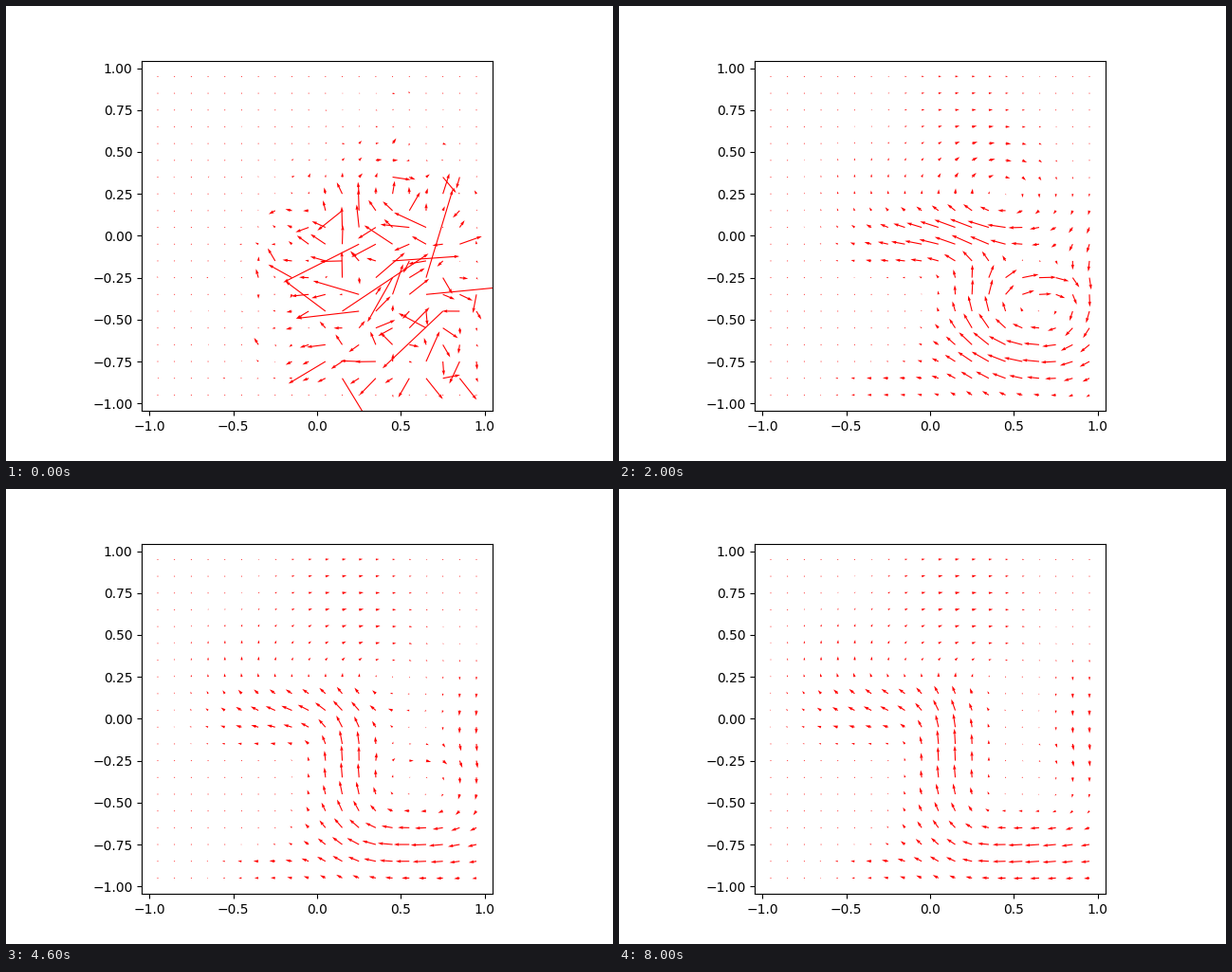
These frames come from a looping animation (640x480 px, 8.05 s). A matplotlib script:

```python
import numpy as np
import matplotlib.pyplot as plt
from matplotlib.animation import FuncAnimation

N = 20            # arrows per side
FRAMES = 161
STEP = 50         # ms
SETTLE = 21       # steps until the opening turbulence is gone

axis = np.linspace(-0.95, 0.95, N)
X, Y = np.meshgrid(axis, axis)


def stream(e, start, end, size):
    """Gaussian current drifting from start to end, each (x, y, u, v)."""
    (x0, y0, *vel0), (x1, y1, *vel1) = start, end
    x, y = x0 + (x1 - x0) * e, y0 + (y1 - y0) * e
    fade = (1 - e) ** 1.8
    vel = np.array(vel0) * fade + np.array(vel1) * (1 - fade)
    weight = np.exp(-(((X - x) / size[0]) ** 2 + ((Y - y) / size[1]) ** 2) / 2)
    return weight[..., None] * vel


def swirl(x, y, speed, radius):
    """Clockwise vortex with its peak speed at the given radius."""
    dx, dy = (X - x) / radius, (Y - y) / radius
    weight = speed * np.exp((1 - dx ** 2 - dy ** 2) / 2)
    return np.stack([dy * weight, -dx * weight], axis=-1)


def flow(t):
    """Velocity in pixels once the turbulence has settled; t in ms."""
    e = np.log(max(t, 1050) / 1050) / np.log(8000 / 1050)
    west = stream(e, (.4, -.01, -32, 3), (-.22, .1, -9, 3), (.33, .09))
    backwash = stream(e, (.15, -.14, -15, 0), (-.4, -.08, -5, 0), (.3, .08))
    column = stream(e, (.38, -.45, -1, 14), (.12, -.18, 0, 16), (.14, .23))
    inner = stream(e, (.57, -.32, 40, 3), (.68, -.2, 2, -1), (.2, .08))
    wall = stream(e, (.94, -.45, -5, -20), (.9, -.1, 0, -7), (.12, .33))
    floor = stream(e, (.55, -.69, -20, 3), (.62, -.8, -16, -1), (.33, .15))
    ramp = stream(e, (.42, -.72, -4, 6), (.05, -.68, -4, 7), (.18, .22))
    tail = stream(e, (-.25, -.9, -6, 1), (-.25, -.88, -6, 0), (.25, .08))
    rise = stream(e, (-.25, .22, -1, 3), (-.5, .35, 0, 4), (.32, .25))
    top = stream(e, (.2, .75, 3, 0), (.15, .75, 5, .7), (.33, .35))
    eddy = swirl(.4, .24, 1 + 7 * (1 - e) ** 1.8, .2)
    return (west + backwash + column + inner + wall + floor
            + ramp + tail + rise + top + eddy)


def opening(calm):
    """Random arrows, longest in the lower right, over an outward push."""
    rng = np.random.default_rng(4)
    dx, dy = X - .5, Y + .35
    dist = np.hypot(dx, dy)
    length = rng.exponential(26 * np.exp(-(dist / .6) ** 2.5) + .4)
    angle = rng.uniform(0, 2 * np.pi, (N, N))
    field = .4 * calm + length[..., None] * np.stack(
        [np.cos(angle), np.sin(angle)], axis=-1)
    push = 10 * np.exp(-((dist - .55) / .18) ** 2) / dist
    field += np.stack([dx * push, dy * push], axis=-1)
    field[[0, -1]] *= .05
    field[:, -1] *= .4
    return field


def diffuse(f, rate=.3):
    p = np.pad(f, ((1, 1), (1, 1), (0, 0)), mode="edge")
    mean = (p[:-2, 1:-1] + p[2:, 1:-1] + p[1:-1, :-2] + p[1:-1, 2:]) / 4
    return (f + rate * (mean - f)) * .95


unrest = [opening(flow(0)) - flow(0)]
for _ in range(SETTLE - 1):
    unrest.append(diffuse(unrest[-1]))


def velocity(n):
    field = flow(n * STEP)
    if n < SETTLE:
        field = field + unrest[n] * (1 - n / SETTLE)
    return field


fig, ax = plt.subplots(figsize=(6.4, 4.8), dpi=100)
start = velocity(0)
arrows = ax.quiver(X, Y, start[..., 0], start[..., 1], color="red",
                   scale=1, scale_units="dots", width=.003)
ax.set_aspect("equal")
ax.set_xticks(np.arange(-1, 1.1, .5))
ax.set_yticks(np.arange(-1, 1.1, .25))
ax.set_xlim(-1.045, 1.045)
ax.set_ylim(-1.045, 1.045)


def update(n):
    field = velocity(n)
    arrows.set_UVC(field[..., 0], field[..., 1])
    return (arrows,)


anim = FuncAnimation(fig, update, frames=FRAMES, interval=STEP,
                     repeat=True, repeat_delay=0)
plt.show()
```
